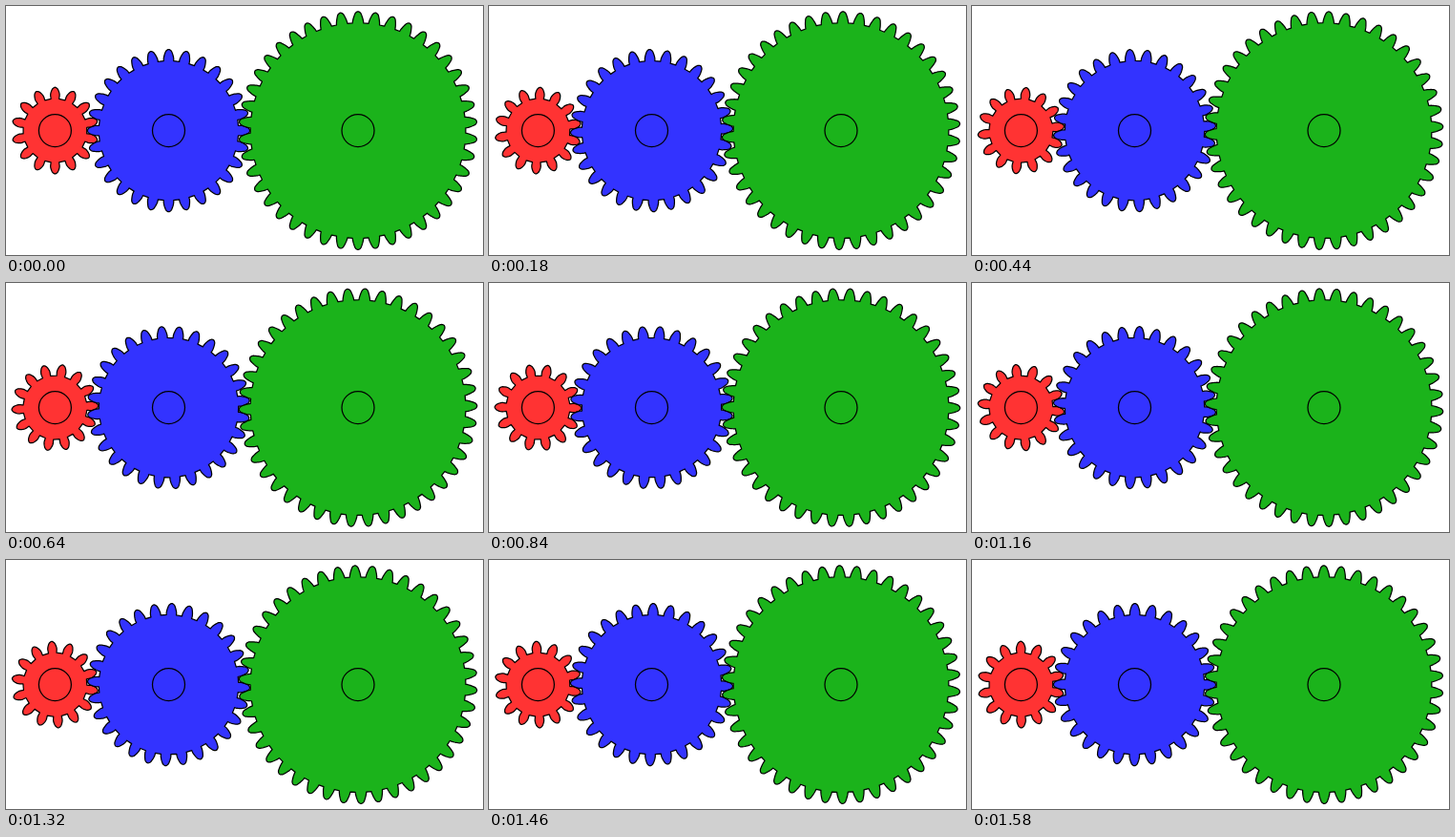
An HTML page that plays this animation: 500x261 px, repeating every 1600 ms.

```html
<!DOCTYPE html>
<html lang="en">
<head>
<meta charset="utf-8">
<title>Gear train</title>
<style>
  html, body { margin: 0; width: 100%; height: 100%; overflow: hidden; background: #fff; }
  svg { display: block; width: 100vw; height: 100vh; }
</style>
</head>
<body>
<svg id="stage" viewBox="0 0 500 261" stroke="#000" stroke-width="1.25" stroke-linejoin="round"></svg>
<script>
const NS = "http://www.w3.org/2000/svg";
const LOOP = 1600, STEP = 20;
const MODULE = 5.672, PRESSURE = 20 * Math.PI / 180;
const CY = 130.6, HUB = 17;
const stage = document.getElementById("stage");

const inv = a => Math.tan(a) - a;

// Involute teeth with rounded tips; the first tooth points up.
function gearPath(teeth) {
  const pitch = MODULE * teeth / 2;
  const base = pitch * Math.cos(PRESSURE);
  const tip = pitch + MODULE, root = pitch - 1.1 * MODULE;
  const round = 2.3, flank = tip - round;

  const halfAngle = r => {
    const a = r > base ? Math.acos(base / r) : 0;
    const k = Math.max(0, (r - flank) / round);
    return (Math.PI / (2 * teeth) + inv(PRESSURE) - inv(a)) * Math.sqrt(Math.max(0, 1 - k * k));
  };

  const radii = [];
  for (let i = 0; i <= 8; i++) radii.push(root + (flank - root) * i / 8);
  for (let i = 1; i <= 6; i++) radii.push(flank + round * Math.sin(i / 6 * Math.PI / 2));

  const side = radii.map(r => [r, halfAngle(r)]);
  const tooth = side.map(([r, a]) => [r, -a]).concat(side.slice(0, -1).reverse());
  const points = [];
  for (let n = 0; n < teeth; n++) {
    const mid = n * 2 * Math.PI / teeth;
    for (const [r, a] of tooth) {
      points.push((r * Math.sin(mid + a)).toFixed(3) + "," + (-r * Math.cos(mid + a)).toFixed(3));
    }
  }
  return "M" + points.join("L") + "Z";
}

function add(parent, tag, attrs) {
  const el = document.createElementNS(NS, tag);
  for (const key in attrs) el.setAttribute(key, attrs[key]);
  return parent.appendChild(el);
}

function makeGear(x, teeth, fill, dir) {
  const group = add(stage, "g", { transform: `translate(${x} ${CY})`, fill });
  const body = add(group, "path", { d: gearPath(teeth) });
  add(group, "circle", { r: HUB });
  return { body, turn: dir * 360 / teeth };
}

const gears = [
  makeGear(51.4, 14, "#ff3333", 1),
  makeGear(170.5, 28, "#3333ff", -1),
  makeGear(369, 42, "#1bb31b", 1)
];

// Each gear advances by one tooth per loop.
function draw(ms) {
  const p = Math.floor((ms % LOOP) / STEP) * STEP / LOOP;
  for (const { body, turn } of gears) {
    body.setAttribute("transform", `rotate(${(turn * p).toFixed(4)})`);
  }
}

const start = performance.now();
function tick() {
  draw(performance.now() - start);
  requestAnimationFrame(tick);
}
draw(0);
requestAnimationFrame(tick);
</script>
</body>
</html>
```
